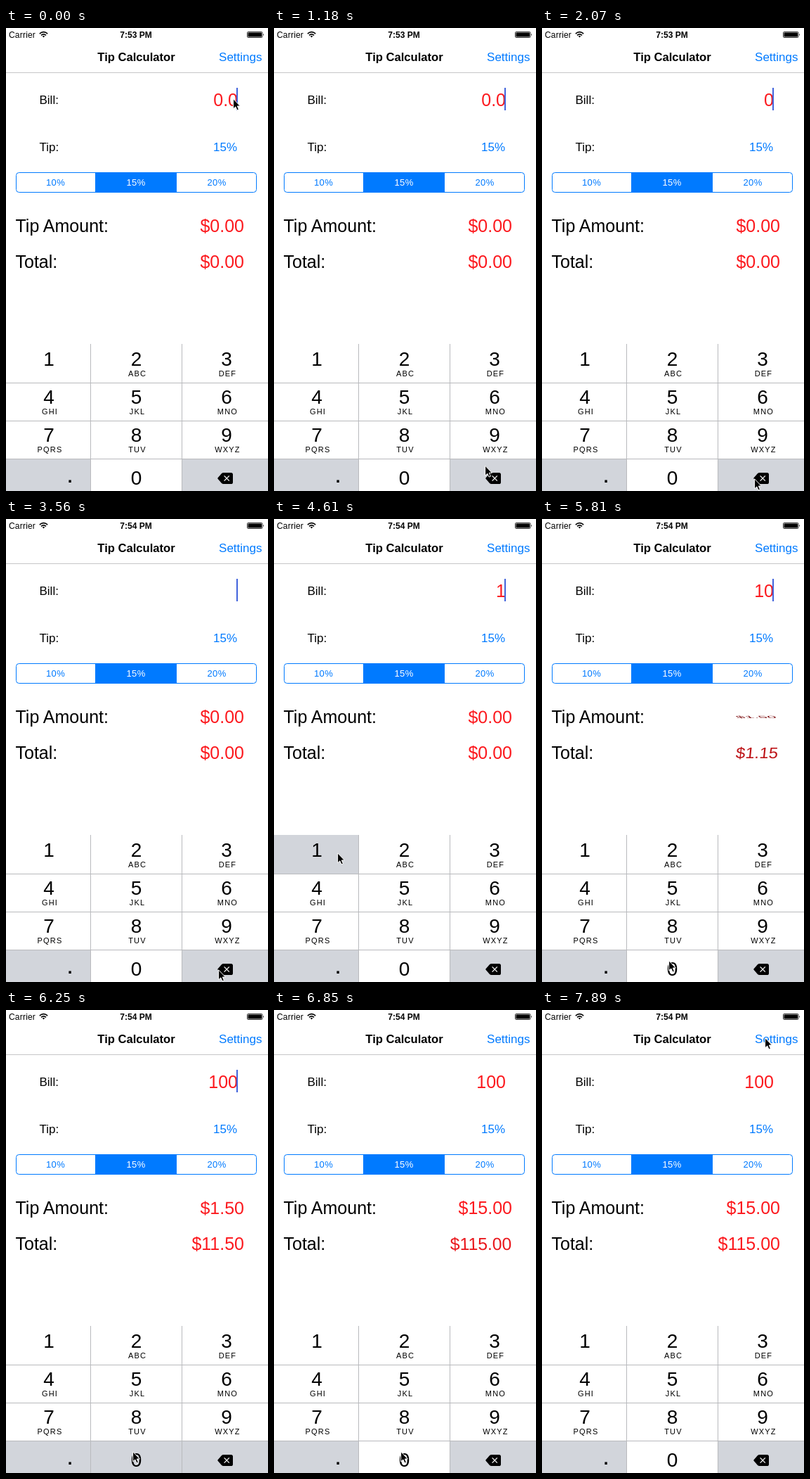
An HTML page for the animation above (8 s loop, 373 by 658 pixels).

```html
<!DOCTYPE html>
<html lang="en">
<head>
<meta charset="utf-8">
<title>Tip Calculator</title>
<style>
  html, body { margin: 0; width: 100%; height: 100%; overflow: hidden; background: #fff; }
  svg { display: block; width: 100vw; height: 100vh; font-family: "Liberation Sans", Arial, sans-serif; }
  .mid { text-anchor: middle; }
  .end { text-anchor: end; }
  .bold { font-weight: bold; }
  .blue { fill: #007aff; }
  .red { fill: #fc1a1f; }
  .s12 { font-size: 12px; }
  .s13 { font-size: 13px; letter-spacing: .4px; }
  .s17 { font-size: 17px; }
  .s25 { font-size: 25px; }
  .digit { font-size: 28px; text-anchor: middle; }
  .abc { font-size: 11px; letter-spacing: 1.2px; text-anchor: middle; }
</style>
</head>
<body>
<svg viewBox="0 0 373 658" xmlns="http://www.w3.org/2000/svg">
  <rect width="373" height="658" fill="#fff"/>

  <!-- status bar -->
  <text class="s12" x="4" y="13.5" letter-spacing=".2">Carrier</text>
  <g fill="none" stroke="#000" stroke-width="1.7">
    <path d="M47.8 8.2Q53.5 3.2 59.2 8.2M50 10.4Q53.5 7.4 57 10.4"/>
    <path d="M51.6 11.6Q53.5 10.2 55.4 11.6L53.5 13.6Z" fill="#000" stroke="none"/>
  </g>
  <text id="clock" class="s12 bold mid" x="185" y="13.5"></text>
  <rect x="343.5" y="5.5" width="21.5" height="8" rx="1.3" fill="none" stroke="#000" stroke-width=".8"/>
  <rect x="344.5" y="6.5" width="19.5" height="6" rx=".6"/>
  <path d="M366 8Q367.7 9.5 366 11Z"/>

  <!-- navigation bar -->
  <text class="bold mid" font-size="16.6" x="185.5" y="47">Tip Calculator</text>
  <text class="s17 blue end" x="364.5" y="47">Settings</text>
  <rect y="63" width="373" height="1" fill="#c6c6c8"/>

  <!-- form -->
  <text class="s17" x="47.5" y="107.5">Bill:</text>
  <text id="bill" class="s25 red end" x="330" y="110.5"></text>
  <rect id="caret" x="328" y="85" width="2" height="32" fill="#4163dc"/>
  <text class="s17" x="47.5" y="174.5">Tip:</text>
  <text class="s17 blue end" x="329" y="174.5">15%</text>
  <rect x="14.5" y="205.5" width="342" height="28" rx="4" fill="none" stroke="#007aff"/>
  <rect x="127" y="205" width="116" height="29" fill="#007aff"/>
  <text class="s13 blue mid" x="70.5" y="224">10%</text>
  <text class="s13 mid" x="185" y="224" fill="#fff">15%</text>
  <text class="s13 blue mid" x="300" y="224">20%</text>
  <text class="s25" x="13.5" y="290">Tip Amount:</text>
  <text class="s25" x="13.5" y="341">Total:</text>
  <text id="tip" class="s25 end" x="69" y="9"></text>
  <text id="total" class="s25 end" x="69" y="9"></text>

  <g id="pad"></g>
  <path d="M301.6 639.2L306.8 633.2Q308 632 309.6 632H320.4Q323 632 323 634.6V645.4Q323 648 320.4 648H309.6Q308 648 306.8 646.8L301.6 640.8Q300.8 640 301.6 639.2Z"/>
  <path d="M310.6 636.4L317.8 643.6M317.8 636.4L310.6 643.6" stroke="#fff" stroke-width="1.3"/>

  <path id="mouse" d="M.6 .8V14.8L3.8 11.9L6 16.8L8.4 15.8L6.3 11H10.4Z" fill="#000" stroke="#fff" stroke-width="1" stroke-linejoin="round"/>
</svg>
<script>
const LOOP = 8000, STEP = 149, FLIP = 500;
const GREY = '#d2d5db';
const $ = id => document.getElementById(id);

// Keypad
const cols = [[0, 120, 61], [121, 129, 185.5], [251, 122, 314]];
const letters = ['', 'ABC', 'DEF', 'GHI', 'JKL', 'MNO', 'PQRS', 'TUV', 'WXYZ'];
let pad = '';
const keyRect = (id, col, y, h, fill) =>
  `<rect id="${id}" x="${cols[col][0]}" y="${y}" width="${cols[col][1]}" height="${h}" fill="${fill}"/>`;
pad += keyRect('key1', 0, 449, 55, '#fff') + keyRect('dot', 0, 613, 45, GREY) +
       keyRect('key0', 1, 613, 45, '#fff') + keyRect('del', 2, 613, 45, GREY);
letters.forEach((abc, i) => {
  const x = cols[i % 3][2], y = 480 + 54 * Math.floor(i / 3);
  pad += `<text class="digit" x="${x}" y="${y}">${i + 1}</text>` +
         `<text class="abc" x="${x + 1.5}" y="${y + 15}">${abc}</text>`;
});
pad += '<text class="digit" x="185.5" y="649">0</text>' +
       '<text class="bold mid" font-size="24" x="91" y="646">.</text>';
for (const y of [504, 558, 612]) pad += `<rect y="${y}" width="373" height="1" fill="#b9babd"/>`;
for (const x of [120, 250]) pad += `<rect x="${x}" y="449" width="1" height="209" fill="#b9babd"/>`;
$('pad').innerHTML = pad;

// Timeline: [start, value]
const clock = [[0, '7:53 PM'], [3260, '7:54 PM']];
const bill = [[0, '0.0'], [1470, '0.'], [1910, '0'], [3400, ''], [4600, '1'], [5500, '10'], [6240, '100']];
const tips = [[0, '$0.00'], [4600, '$0.15'], [5533, '$1.50'], [6235, '$15.00']];
const totals = [[0, '$0.00'], [4839, '$1.15'], [5671, '$11.50'], [6414, '$115.00']];
const presses = {
  del: [[1470, 1620], [1910, 2060], [3260, 3550]],
  key1: [[4600, 4750]],
  key0: [[5500, 5650], [6240, 6390]]
};
const caretOff = [[430, 730], [2660, 2810], [3110, 3260], [4000, 4300], [6690, 7130], [7580, 8000]];
// Pointer: [time, x, y]
const path = [
  [0, 323, 100], [120, 322, 102], [440, 240, 255], [590, 177, 430], [740, 225, 565], [880, 300, 621],
  [1170, 300, 621], [1330, 302, 640], [3800, 302, 640], [4300, 90, 474], [4700, 90, 474],
  [5057, 166, 614], [5200, 180, 627], [6845, 180, 627], [7870, 317, 39], [8000, 317, 39]
];

const ease = p => (1 - Math.cos(Math.PI * p)) / 2;
const inside = (spans, t) => spans.some(([a, b]) => t >= a && t < b);
const latest = (list, t) => list.reduce((n, e, i) => t >= e[0] ? i : n, 0);

function pointer(t) {
  const i = Math.min(latest(path, t), path.length - 2);
  const [a, x, y] = path[i], [b, u, v] = path[i + 1];
  const p = ease(Math.min(1, (t - a) / (b - a)));
  return [x + (u - x) * p, y + (v - y) * p];
}

// Label turning over around its horizontal axis, dimmed while edge-on
function flip(el, list, t, y) {
  const n = latest(list, t);
  const p = n ? ease(Math.min(1, (t - list[n][0]) / FLIP)) : 1;
  const angle = Math.PI * (p < .5 ? p : p - 1);
  const s = Math.sin(angle), depth = Math.abs(s), light = 1 - .52 * depth;
  el.textContent = list[p < .5 ? n - 1 : n][1];
  el.setAttribute('transform',
    `matrix(${1 - .085 * depth} 0 ${-.2 * s} ${Math.cos(angle)} 270 ${y})`);
  el.setAttribute('fill', `rgb(${[252, 26, 31].map(c => Math.round(c * light))})`);
}

function draw(ms) {
  const t = Math.max(0, Math.floor((ms + 16) / STEP) * STEP - 9);
  $('clock').textContent = clock[latest(clock, t)][1];
  $('bill').textContent = bill[latest(bill, t)][1];
  $('caret').setAttribute('opacity', inside(caretOff, t) ? 0 : 1);
  flip($('tip'), tips, t, 281);
  flip($('total'), totals, t, 332);
  for (const id in presses) {
    const lit = inside(presses[id], t) !== (id === 'del');
    $(id).setAttribute('fill', lit ? GREY : '#fff');
  }
  $('mouse').setAttribute('transform', `translate(${pointer(t)})`);
}

const start = performance.now();
function frame() {
  draw((performance.now() - start) % LOOP);
  requestAnimationFrame(frame);
}
frame();
</script>
</body>
</html>
```
